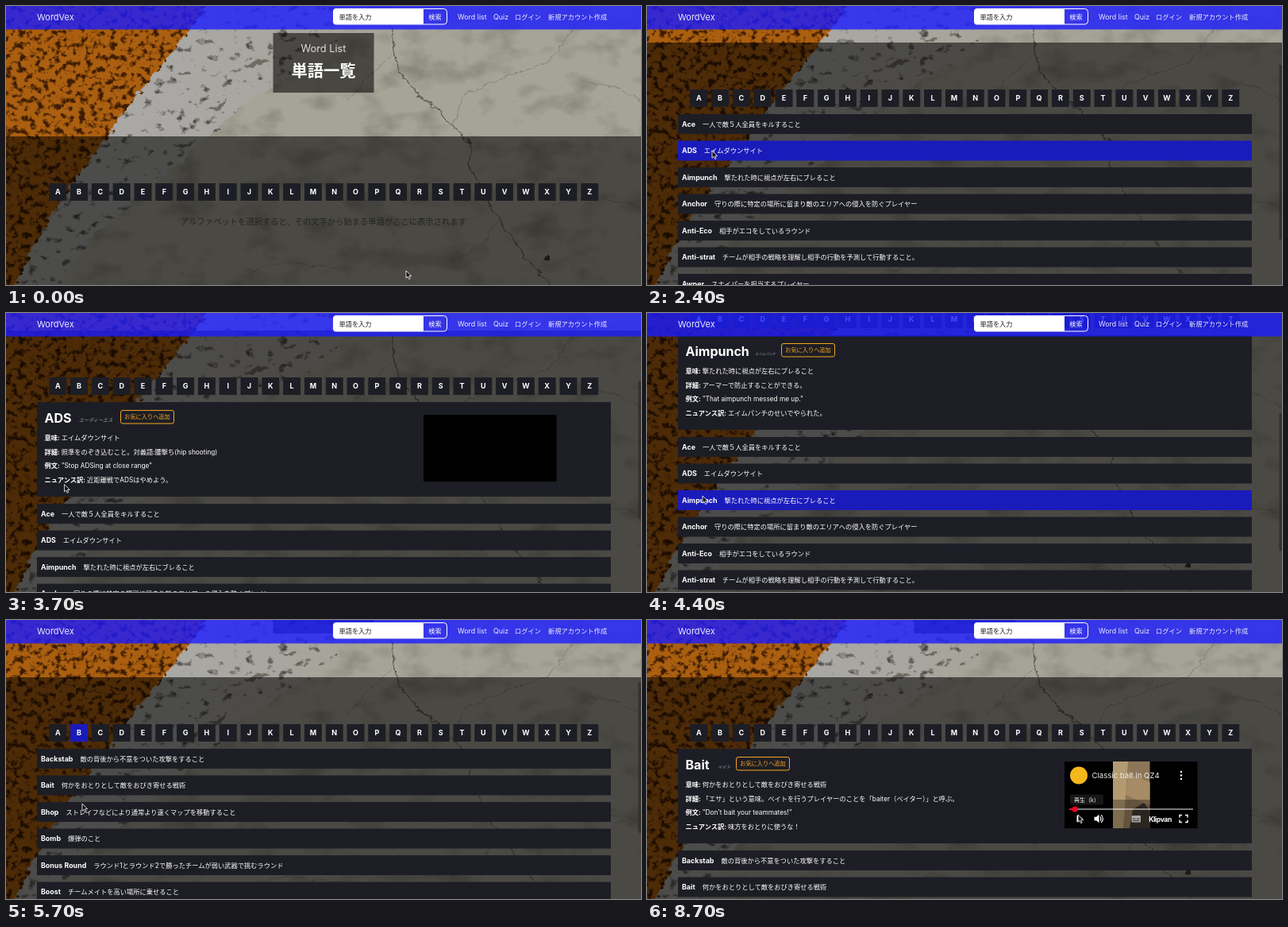
Recreate the animation shown at these times as an HTML page. Size 800 by 351 pixels, loop 8800 ms.

```html
<!DOCTYPE html>
<html lang="ja">
<head>
<meta charset="utf-8">
<title>単語一覧</title>
<style>
html, body { margin: 0; width: 100%; height: 100%; overflow: hidden; background: #4a4944; }
svg { position: absolute; left: 0; top: 0; width: 100%; height: 100%; }
#wall { will-change: transform; }
text { font-family: Inter, "Noto Sans CJK JP", "Noto Sans CJK", sans-serif; fill: #fff; white-space: pre; }
.b { font-weight: 700; }
.mid { text-anchor: middle; }
</style>
</head>
<body>
<svg id="wall" viewBox="0 0 800 351"></svg>
<svg id="page" viewBox="0 0 800 351"></svg>
<script>
const LOOP = 8800;
const TILE = '#1d1e25', BLUE = '#1a1bbb', GOLD = '#f5a623';
const $ = id => document.getElementById(id);

// ---- markup helpers
const rect = (x, y, w, h, fill, more = '') =>
  `<rect x="${x}" y="${y}" width="${w}" height="${h}" fill="${fill}" ${more}/>`;
const text = (x, y, size, str, more = '') =>
  `<text x="${x}" y="${y}" font-size="${size}" ${more}>${str}</text>`;
const line = (d, color, w, more = '') =>
  `<path d="${d}" fill="none" stroke="${color}" stroke-width="${w}" ${more}/>`;
const group = (id, body) => `<g id="${id}">${body}</g>`;

// ---- painted wall
const rough = (id, freq, seed, gain, bias, rgb, shift) => `
  <filter id="${id}" x="0" y="0" width="800" height="351" filterUnits="userSpaceOnUse" color-interpolation-filters="sRGB">
    <feTurbulence type="fractalNoise" baseFrequency="${freq}" numOctaves="4" seed="${seed}" result="n"/>
    <feDisplacementMap in="SourceGraphic" in2="n" scale="${shift}" xChannelSelector="R" yChannelSelector="G" result="s"/>
    <feColorMatrix in="n" values="0 0 0 0 ${rgb[0]} 0 0 0 0 ${rgb[1]} 0 0 0 0 ${rgb[2]} ${-gain} 0 0 0 ${bias}"/>
    <feComposite in2="s" operator="in" result="d"/>
    <feMerge><feMergeNode in="s"/><feMergeNode in="d"/></feMerge>
  </filter>`;

$('wall').innerHTML = `<defs>
  ${rough('plain', '.02 .03', 8, 1.2, .62, [.38, .37, .33], 0)}
  ${rough('band', '.07 .1', 4, 5, 1.95, [.3, .29, .27], 14)}
  ${rough('paint', '.13', 11, 5, 2.5, [.24, .11, .01], 12)}
  ${rough('cracks', '.08', 5, 0, 0, [0, 0, 0], 9)}
  <linearGradient id="fade" x1="0" x2="1"><stop offset=".5" stop-color="#a9a8a4"/><stop offset="1" stop-color="#a6a398"/></linearGradient>
  </defs>
  ${rect(0, 0, 800, 351, '#a6a397', 'filter="url(#plain)"')}
  <path d="M250 -20L470 -20 400 60 300 125 215 200 110 290 50 371 -20 371Z" fill="url(#fade)" filter="url(#band)"/>
  <path d="M-20 -20L264 -20 232 30 190 82 150 130 129 164 84 222 36 300 2 371 -20 371Z" fill="#ab5f10" filter="url(#paint)"/>
  <g filter="url(#cracks)">
    ${line('M480 0L487 40 492 78 516 108 540 128 562 150 586 174 582 200 600 232 622 270 652 312 688 355', '#55534a', 1.1)}
    ${line('M720 20L694 58 676 72 620 92 577 112 562 150M487 60L456 90 430 120M735 95L770 103 804 122', '#77746a', .7)}
    ${line('M620 270L600 300 560 322M688 250L740 240 800 252M300 335L350 322 420 330', '#716e64', .6)}
    <ellipse cx="684" cy="317" rx="4" ry="3.5" fill="#3a3832"/>
    <path d="M252 132l12 -5 16 -12 -10 16zM300 75l18 -9 14 2 -20 9zM345 45l16 -6 6 4zM215 88l14 -8 4 5z" fill="#6f6c63"/>
  </g>`;

// ---- word data: term, description
const words = {
  A: [['Ace', '一人で敵５人全員をキルすること'], ['ADS', 'エイムダウンサイト'],
    ['Aimpunch', '撃たれた時に視点が左右にブレること'],
    ['Anchor', '守りの際に特定の場所に留まり敵のエリアへの侵入を防ぐプレイヤー'],
    ['Anti-Eco', '相手がエコをしているラウンド'],
    ['Anti-strat', 'チームが相手の戦略を理解し相手の行動を予測して行動すること。'],
    ['Awper', 'スナイパーを担当するプレイヤー']],
  B: [['Backstab', '敵の背後から不意をついた攻撃をすること'], ['Bait', '何かをおとりとして敵をおびき寄せる戦術'],
    ['Bhop', 'ストレイフなどにより通常より速くマップを移動すること'], ['Bomb', '爆弾のこと'],
    ['Bonus Round', 'ラウンド1とラウンド2で勝ったチームが弱い武器で挑むラウンド'],
    ['Boost', 'チームメイトを高い場所に乗せること']]
};
const labels = ['意味', '詳細', '例文', 'ニュアンス訳'];

const list = key => group('list' + key, words[key].map(([term, desc], i) => {
  const y = i * 33.5;
  return rect(39, y, 723, 25, TILE, `id="${term}"`) +
    `<text x="44" y="${y + 15.6}" font-size="8.25"><tspan class="b" font-size="8.9">${term}</tspan><tspan dx="9">${desc}</tspan></text>`;
}).join(''));

const card = (id, term, kana, kanaX, kanaSize, btnX, lines, extra = '') => group(id,
  rect(39, 254, 723, 119, TILE) +
  text(48.5, 280, 16, term, 'font-weight="650"') +
  text(kanaX, 279, kanaSize, kana, 'class="b" font-style="italic" style="fill:#74757a"') +
  rect(btnX + .5, 264.5, 67, 16.5, 'none', `rx="2.5" stroke="${GOLD}"`) +
  text(btnX + 34, 275.4, 7.2, 'お気に入りへ追加', `class="mid" style="fill:${GOLD}"`) +
  lines.map((s, i) => `<text x="48.5" y="${301.6 + i * 17.9}" font-size="8.25"><tspan class="b">${labels[i]}: </tspan>${s}</text>`).join('') +
  extra);

const black = rect(526, 270, 167.5, 84, '#000');
const player = black +
  group('still', rect(575, 270, 70, 84, '#9b7f67') +
    '<path d="M575 290L645 312V354H575z" fill="#b08f77"/><path d="M575 270H612L590 286 575 284z" fill="#5a4a3e"/><path d="M628 330l10 -6 4 30h-18z" fill="#4a4238"/>' +
    line('M575 316L645 338M592 295L584 354M618 304L612 354', '#8a6c57', .8) +
    rect(526, 270, 167.5, 34, '#000', 'opacity=".35"') +
    rect(596.5, 298, 27, 27, '#f00020')) +
  group('clip', rect(587, 270, 46.5, 84, '#8d7658') +
    '<path d="M587 270H606L600 354H587z" fill="#b39a70"/><path d="M606 285L633.5 296V325L603 312z" fill="#a68b66"/><path d="M612 330l14 -8 7.5 10v22H608z" fill="#3c352c"/>' +
    rect(526, 318, 167.5, 36, '#000', 'opacity=".3"') +
    rect(532, 329.2, 156, 1.6, '#fff', 'opacity=".6"') +
    rect(532, 329.2, 0, 1.6, '#f00020', 'id="bar"') +
    '<circle id="knob" cy="330" r="3.6" fill="#f00020"/>' +
    '<path id="go" d="M541.5 337.5L549.5 342 541.5 346.5z" fill="#fff"/>' +
    '<path id="hold" d="M541.5 337.5h2.8v9h-2.8zM546.2 337.5h2.8v9h-2.8z" fill="#fff"/>' +
    '<path d="M563.5 339.7h2.6l3.4 -3v10.6l-3.4 -3h-2.6z" fill="#fff"/>' +
    line('M571 339.4q2 2.6 0 5.2M572.2 337q4.4 5 0 10', '#fff', 1.1) +
    rect(610.5, 338, 11.5, 8.5, '#aaa', 'rx="1"') + line('M612 342h3.5M617 342h3.5M612 344.4h8.5', '#333', 1) +
    text(646.5, 345.6, 8.6, 'Klipvan', 'class="mid b" letter-spacing="-.4"') +
    line('M671 340.5v-3h3M678 337.5h3v3M681 343.5v3h-3M674 346.5h-3v-3', '#fff', 1.4) +
    group('tip', rect(533, 311.5, 42, 13, '#1b1b1b', 'rx="2" opacity=".88"') + text(554, 320.8, 7, '再生（k）', 'class="mid"'))) +
  group('info', '<circle cx="544" cy="287.5" r="11" fill="#f5b81c"/>' +
    text(560.5, 291.2, 9.6, 'Classic bait in QZ4', 'style="fill:#eee"') +
    [-4.5, 0, 4.5].map(d => `<circle cx="673" cy="${287.5 + d}" r="1.2" fill="#fff"/>`).join(''));

const letters = [...'ABCDEFGHIJKLMNOPQRSTUVWXYZ'].map((c, i) => {
  const x = 54.3 + i * 26.8;
  return rect(x.toFixed(1), 223, 22, 22, TILE, `id="key${c}"`) + text((x + 11).toFixed(1), 237.4, 9, c, 'class="mid b"');
}).join('');

const navLink = (x, s) => text(x, 17.2, /[a-z]/.test(s) ? 8.9 : 8.25, s, 'opacity=".9"');
const nav = rect(0, 0, 800, 29.5, 'rgb(28,28,255)', 'opacity=".8"') +
  text(39, 18.2, 11, 'WordVex', 'opacity=".9"') +
  '<path d="M416 3H525.5V23.5H416a4 4 0 0 1 -4 -4V7a4 4 0 0 1 4 -4z" fill="#fff"/>' +
  text(419.5, 16.8, 8.2, '単語を入力', 'style="fill:#222"') +
  line('M525.5 3.5H551.5a4 4 0 0 1 4 4V19a4 4 0 0 1 -4 4H525.5z', '#fff', 1) +
  text(540.5, 16.8, 8.2, '検索', 'class="mid"') +
  navLink(569, 'Word list') + navLink(614, 'Quiz') + navLink(641, 'ログイン') + navLink(683, '新規アカウント作成');

$('page').innerHTML =
  group('scroll',
    rect(336.5, 34, 127, 75, '#000', 'opacity=".56"') +
    text(400, 58, 12.8, 'Word List', 'class="mid" style="fill:#deded9"') +
    text(400, 89, 20.3, '単語一覧', 'class="mid b"') +
    rect(0, 164, 800, 700, '#000', 'opacity=".55"') + letters +
    text(400, 275, 10.3, 'アルファベットを選択すると、その文字から始まる単語がここに表示されます', 'id="hint" class="mid" style="fill:#24241f"') +
    card('cardADS', 'ADS', 'エーディーエス', 92, 6.1, 144,
      ['エイムダウンサイト', '照準をのぞき込むこと。対義語:腰撃ち(hip shooting)', '"Stop ADSing at close range"', '近距離戦でADSはやめよう。'], black) +
    card('cardAim', 'Aimpunch', 'エイムパンチ', 136, 4.3, 169,
      ['撃たれた時に視点が左右にブレること', 'アーマーで防止することができる。', '"That aimpunch messed me up."', 'エイムパンチのせいでやられた。']) +
    card('cardBait', 'Bait', 'ベイト', 89, 5.4, 112,
      ['何かをおとりとして敵をおびき寄せる戦術', '「エサ」という意味。ベイトを行うプレイヤーのことを「baiter（ベイター）」と呼ぶ。', '"Don\'t bait your teammates!"', '味方をおとりに使うな！'], player) +
    list('A') + list('B')) +
  rect(796.5, 0, 3.5, 200, '#2d2d2b', 'id="thumb" rx="1.7" opacity=".8"') +
  nav +
  '<path id="arrow" d="M0 0V9.2L2.1 7.3 3.6 10.6 5.2 9.9 3.7 6.7H6.6z" fill="#111" stroke="#fff" stroke-width=".8"/>' +
  group('beam', line('M-2.5 -5Q0 -5 0 -3.5Q0 -5 2.5 -5M0 -4V4M-2.5 5Q0 5 0 3.5Q0 5 2.5 5', '#ddd', 1.1));

// ---- timing
const scrollKeys = [[0, 0], [1800, 0], [1900, 3], [2350, 118], [2600, 118], [3100, 35], [3350, 35], [4000, 226],
  [4450, 226], [4950, 0], [5350, 0], [5700, 92], [6350, 92], [6900, 47], [7000, 47], [7400, 92]];
const mouseKeys = [[0, 504, 333], [200, 504, 333], [900, 65, 233], [1200, 65, 233], [1900, 13, 208], [2350, 82, 182],
  [3350, 82, 182], [3900, 70, 230], [4500, 70, 230], [5000, 96, 231], [5750, 96, 231], [6050, 100, 213],
  [6950, 100, 213], [7450, 608, 218], [7650, 608, 218], [8100, 543, 245]];

function at(keys, t) {
  const n = keys.findIndex(k => k[0] > t);
  if (n < 0) return keys[keys.length - 1].slice(1);
  const a = keys[n - 1], b = keys[n], u = (t - a[0]) / (b[0] - a[0]), e = u * u * (3 - 2 * u);
  return a.slice(1).map((v, i) => v + (b[i + 1] - v) * e);
}

const show = (id, on) => $(id).setAttribute('display', on ? 'inline' : 'none');
const move = (id, x, y) => $(id).setAttribute('transform', `translate(${x} ${y})`);
const tint = (id, on) => $(id).setAttribute('fill', on ? BLUE : TILE);

function draw(t) {
  const within = (a, b) => t >= a && t < b;
  const [s] = at(scrollKeys, t), [mx, my] = at(mouseKeys, t);
  const onB = t >= 5300, detail = within(2500, 5300) || t >= 6200;
  move('scroll', 0, -s);

  show('hint', t < 1000);
  show('listA', within(1000, 5300));
  show('listB', onB);
  move(onB ? 'listB' : 'listA', 0, detail ? 382 : 254);
  show('cardADS', within(2500, 4200));
  show('cardAim', within(4200, 5300));
  show('cardBait', t >= 6200);

  tint('keyA', within(800, 1300));
  tint('keyB', within(4900, 5800));
  tint('ADS', within(2300, 2500));
  tint('Aimpunch', within(3900, 4500));
  tint('Bait', within(5900, 6200));

  const paused = t >= 8200, done = Math.max(0, Math.min(t, 8200) - 7600) / 600 * 7;
  show('still', within(6500, 7600));
  show('info', t >= 6500);
  show('clip', t >= 7600);
  show('tip', paused);
  show('go', paused);
  show('hold', !paused);
  $('bar').setAttribute('width', done);
  $('knob').setAttribute('cx', 532 + done);

  show('thumb', within(1800, 4950) || within(5350, 7600));
  $('thumb').setAttribute('y', onB ? 30 + s * .52 : 17 + s * .48);
  $('thumb').setAttribute('height', onB ? (detail ? 180 : 190) : (detail ? 174 : 220));

  const beam = within(2800, 3400);
  show('beam', beam);
  show('arrow', !beam);
  move(beam ? 'beam' : 'arrow', mx, my);
}

function tick() {
  draw(performance.now() % LOOP);
  requestAnimationFrame(tick);
}
tick();
</script>
</body>
</html>
```
